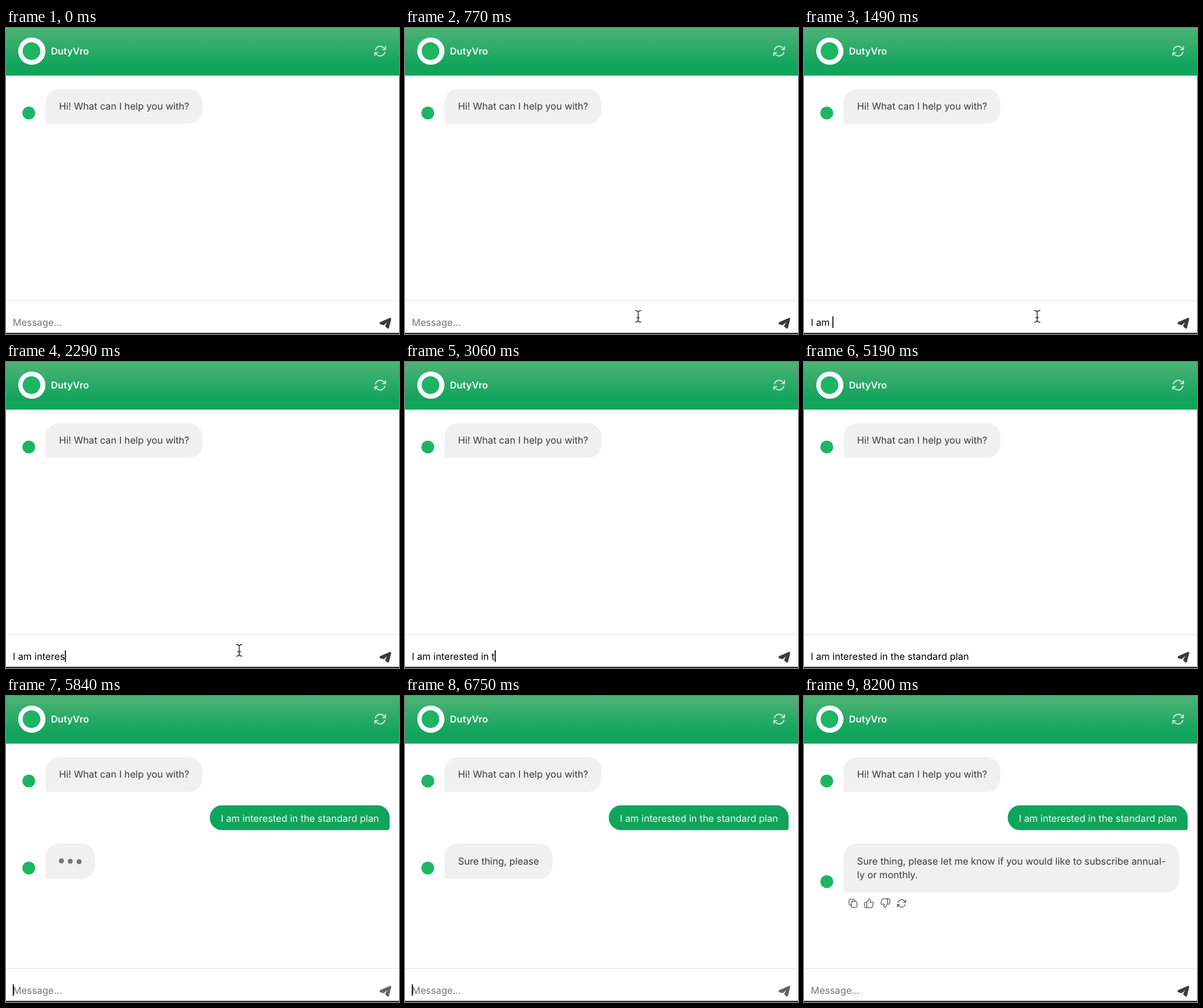
Write an HTML page that moves like this. It is 578 by 450 pixels and loops after 8530 ms.

```html
<!DOCTYPE html>
<html lang="en">
<head>
<meta charset="utf-8">
<title>Chat</title>
<style>
  html, body { margin: 0; width: 100%; height: 100%; overflow: hidden; background: #fff; }
  svg { display: block; width: 100%; height: 100%; }
  text { font: 14px Inter, sans-serif; white-space: pre; text-rendering: geometricPrecision; fill: #3a3a3c; }
  .line { fill: none; stroke: #3c3c3c; stroke-linecap: round; stroke-linejoin: round; }
  .grey { fill: #f0f0f0; }
  .green { fill: #10a45c; }
  .mark { fill: #1db564; }
</style>
</head>
<body>
<svg viewBox="0 0 578 450">
  <defs>
    <linearGradient id="shade" x2="0" y2="1">
      <stop offset="0" stop-color="#4db375"/>
      <stop offset=".8" stop-color="#10a45c"/>
    </linearGradient>
    <path id="cycle" d="M16.023 9.348h4.992M2.985 19.644v-4.992h4.992m-4.993 0 3.181 3.183a8.25 8.25 0 0 0 13.803-3.7M4.031 9.865a8.25 8.25 0 0 1 13.803-3.7l3.181 3.182m0-4.991v4.99"/>
    <path id="thumb" d="M7 10v12M15 5.88 14 10h5.83a2 2 0 0 1 1.92 2.56l-2.33 8A2 2 0 0 1 17.5 22H4a2 2 0 0 1-2-2v-8a2 2 0 0 1 2-2h2.76a2 2 0 0 0 1.79-1.11L12 2a3.13 3.13 0 0 1 3 3.88Z"/>
  </defs>

  <rect width="578" height="70" fill="url(#shade)"/>
  <circle cx="38" cy="34" r="20" fill="#fff"/>
  <circle class="mark" cx="37.5" cy="34" r="13"/>
  <text x="66" y="39" style="font-weight:600;fill:#f4fbf7">DutyVro</text>
  <use href="#cycle" class="line" style="stroke:#c9ecd8;stroke-width:1.9" transform="translate(550.3 34) scale(.86) translate(-12 -12)"/>

  <path id="hello" class="grey"/>
  <circle class="mark" cx="33.5" cy="125" r="9.5"/>
  <text x="78" y="120">Hi! What can I help you with?</text>

  <g id="ask">
    <path id="askBox" class="green"/>
    <text x="316" y="185" style="fill:#f4fbf7">I am interested in the standard plan</text>
  </g>

  <g id="reply">
    <path id="replyBox" class="grey"/>
    <circle id="replyMark" class="mark" cx="33.5" r="9.5"/>
    <text id="line1" x="78" y="248"></text>
    <text id="line2" x="78" y="268"></text>
    <g id="dots" fill="#74747c">
      <circle cx="81.5" r="3.6"/><circle cx="94.5" r="3.6"/><circle cx="107.5" r="3.6"/>
    </g>
  </g>

  <g id="tools" class="line" stroke-width="1.5">
    <path stroke-width="1" d="M69 307.5h-1a1.8 1.8 0 0 1-1.8-1.8v-5a1.8 1.8 0 0 1 1.8-1.8h5a1.8 1.8 0 0 1 1.8 1.8v1"/>
    <rect stroke-width="1" x="69.4" y="302" width="8.6" height="8.8" rx="1.8"/>
    <use href="#thumb" transform="translate(95.6 304.6) scale(.66) translate(-12 -12)"/>
    <use href="#thumb" transform="translate(119.6 304.8) rotate(180) scale(.66) translate(-12 -12)"/>
    <use href="#cycle" transform="translate(143.6 305) scale(.67) translate(-12 -12)"/>
  </g>

  <rect y="400" width="578" height="1" fill="#e6e6e6"/>
  <text id="hint" x="10" y="437.5" style="fill:#757575">Message...</text>
  <text id="draft" x="10" y="437.5" style="fill:#000"></text>
  <rect id="caret" y="424" width="1.5" height="17"/>
  <path id="send" d="M564.2 426.4Q567 425.4 566.5 428.2L563.4 440.4Q562.4 443 560.4 441.4L557.4 438.2L560.8 432.4L555.6 437L551 436Q548 434.6 550.4 432.4Z"/>
  <path id="pointer" class="line" stroke-width="1.4" d="M-4-8.5Q0-8.5 0-5.5V5.5Q0 8.5-4 8.5M4-8.5Q0-8.5 0-5.5M0 5.5Q0 8.5 4 8.5M-2 2H2"/>
  <rect y="448.4" width="578" height="1.6" fill="#0c0c0c"/>
</svg>
<script>
const LOOP = 8530, SENT = 5330, DOTS = 5430, DONE = 6950;
const phrase = 'I am interested in the standard plan';
const keys = [1110, 1200, 1290, 1390, 1490, 1630, 1710, 1790, 1890, 2010, 2130, 2290,
  2530, 2620, 2710, 2870, 2870, 2910, 3060, 3060, 3260, 3340, 3420, 3420, 3610, 3800,
  3880, 4040, 4040, 4180, 4320, 4400, 4400, 4520, 4610, 4690];
const caretOn = [[900, 5190], [SENT, 6110], [6610, 7110], [7610, 8110]];
const full = ['Sure thing, please let me know if you would like to subscribe annual-', 'ly or monthly.'];
// [time, letters shown on the first line, letters shown on the second]
const stream = [[6500, 4, 0], [6620, 11, 0], [6750, 18, 0], [6830, 48, 0], [6890, 69, 5], [DONE, 69, 14]];

const $ = id => document.getElementById(id);
const show = (id, on) => $(id).style.display = on ? '' : 'none';
const between = (t, a, b) => t >= a && t < b;

function bubble(id, x, y, w, h, r, bl, br) {
  $(id).setAttribute('d', `M${x + r} ${y}h${w - 2 * r}a${r} ${r} 0 0 1 ${r} ${r}v${h - r - br}` +
    `a${br} ${br} 0 0 1 ${-br} ${br}h${bl + br - w}a${bl} ${bl} 0 0 1 ${-bl} ${-bl}v${r + bl - h}a${r} ${r} 0 0 1 ${r} ${-r}z`);
}

function drawReply(t) {
  show('reply', t >= DOTS);
  if (t < DOTS) return;
  const [, a, b] = stream.filter(s => t >= s[0]).pop() || [0, 0, 0];
  $('line1').textContent = full[0].slice(0, a);
  $('line2').textContent = full[1].slice(0, b);
  const w = a ? $('line1').getComputedTextLength() + 40 : 73;
  const h = b ? 72 : 52;
  bubble('replyBox', 58, 217, w, h, 20, 4, 20);
  $('replyMark').setAttribute('cy', 201 + h);
  show('dots', !a);
  [...$('dots').children].forEach((dot, i) =>
    dot.setAttribute('cy', 243 + 1.5 * Math.sin(2 * Math.PI * ((t - 5840) / 1000 + (i - 1) * .06))));
}

function drawInput(t) {
  const typed = t < SENT ? phrase.slice(0, keys.filter(k => t >= k).length) : '';
  $('draft').textContent = typed;
  show('hint', !typed);
  show('caret', caretOn.some(([a, b]) => between(t, a, b)));
  $('caret').setAttribute('x', 10 + (typed ? $('draft').getComputedTextLength() : 0));
  $('send').setAttribute('fill', between(t, SENT, DONE) ? '#656565' : '#3a3a3e');
}

function drawPointer(t) {
  show('pointer', between(t, 300, 2350));
  const left = (1 - Math.min(1, Math.max(0, (t - 300) / 550))) ** 3;
  $('pointer').setAttribute('transform', `translate(${343 - 14 * left} ${424 + 34 * left})`);
}

function draw(t) {
  show('ask', t >= SENT);
  show('tools', t >= DONE);
  drawReply(t);
  drawInput(t);
  drawPointer(t);
}

bubble('hello', 58, 90, 231, 51, 20, 4, 20);
bubble('askBox', 299.7, 160.7, 264.6, 36.6, 18, 18, 4);

const start = performance.now();
function tick() {
  draw((performance.now() - start) % LOOP);
  requestAnimationFrame(tick);
}
tick();
</script>
</body>
</html>
```
